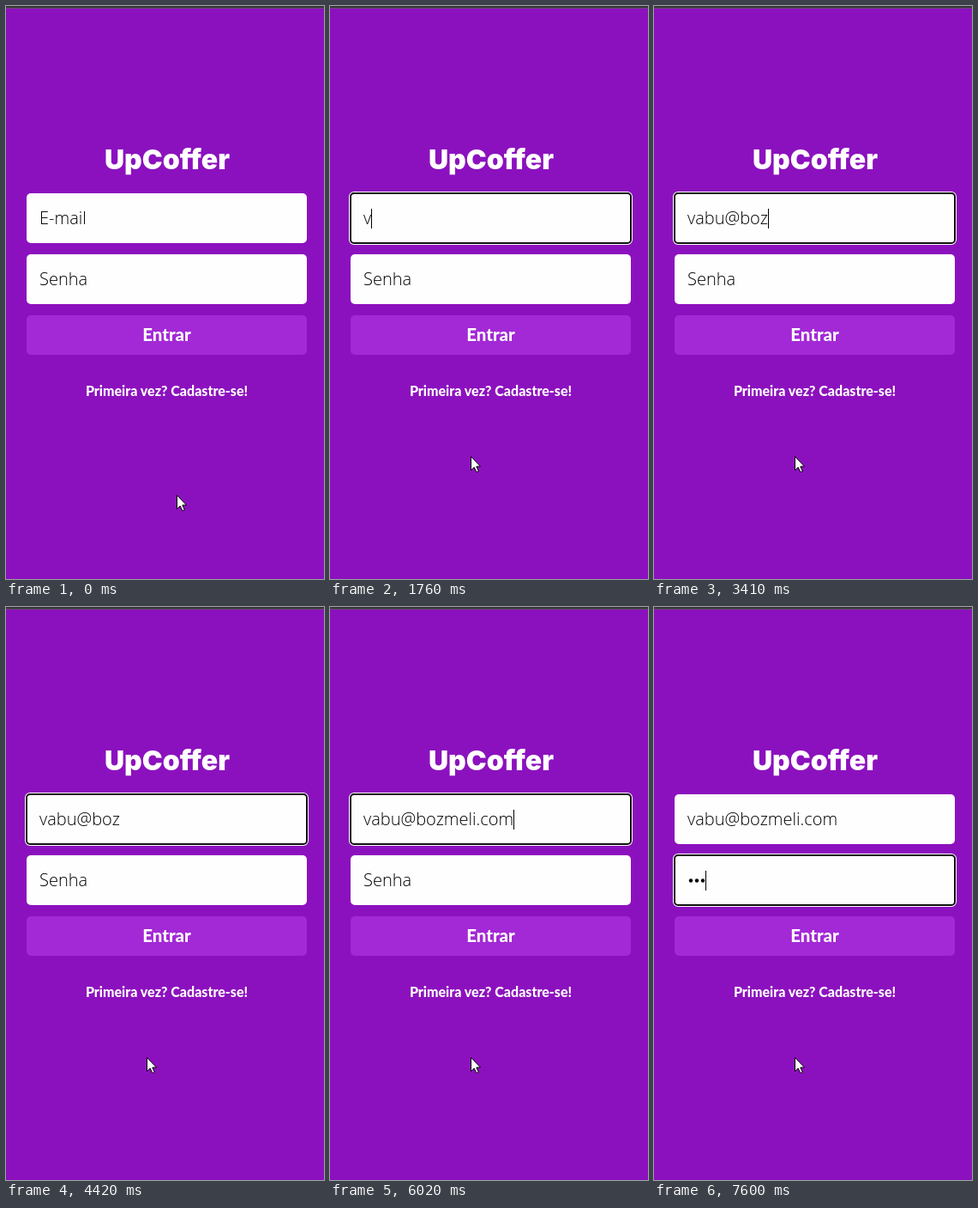
An HTML page that plays this animation: 371 by 667 pixels, repeating every 8000 ms.

```html
<!DOCTYPE html>
<html lang="pt">
<head>
<meta charset="utf-8">
<title>Login</title>
<style>
  html, body { margin: 0; width: 100%; height: 100%; overflow: hidden; background: #8c11be; }
  svg { display: block; width: 100vw; height: 100vh; }
  text { font: 350 20px "Open Sans", sans-serif; white-space: pre; }
  .light { font: 800 20.5px Lato, sans-serif; fill: #fff; text-anchor: middle; }
  .title { font: 900 32px Inter, sans-serif; }
  .link { font-size: 16px; }
</style>
</head>
<body>
<svg viewBox="0 0 371 667">
  <rect width="371" height="667" fill="#8c11be"/>
  <rect width="371" height="2" fill="#38353b"/>
  <rect y="2" width="371" height="1" fill="#5d5263"/>

  <text class="light title" x="188" y="190">UpCoffer</text>

  <rect x="24" y="218" width="327" height="58" rx="5" fill="#fefefe"/>
  <rect x="24" y="289" width="327" height="58" rx="5" fill="#fefefe"/>
  <g id="ring" fill="none">
    <rect x="24" y="218" width="327" height="58" rx="4" stroke="#fff" stroke-width="4"/>
    <rect x="24" y="218" width="327" height="58" rx="4" stroke="#101010" stroke-width="2"/>
  </g>
  <text id="email" x="39" y="254"></text>
  <text id="password" x="39" y="325">Senha</text>
  <g id="dots">
    <circle cx="43" cy="318.5" r="2.2"/>
    <circle cx="50" cy="318.5" r="2.2"/>
    <circle cx="57" cy="318.5" r="2.2"/>
  </g>
  <rect id="caret" width="1" height="23"/>

  <rect x="24" y="360" width="327" height="46" rx="5" fill="#a328d6"/>
  <text class="light" x="187.5" y="390">Entrar</text>
  <text class="light link" x="187.5" y="454">Primeira vez? Cadastre-se!</text>

  <path id="arrow" d="M.5 .5V16.5L4.2 13L6.8 18.5L9.4 17.5L6.8 12H11.5Z" fill="#fff" stroke="#000"/>
  <path id="beam" d="M-3 -7.5H-1M1 -7.5H3M-3 7.5H-1M1 7.5H3M0 -7V7" fill="none" stroke="#000"/>
</svg>
<script>
const LOOP = 8000;
const TICK = 120;        // screen refresh, also the pace within a burst of keys
const BLINK = 460;
const FIELD_GAP = 71;
const EMAIL_FOCUS = 720;
const PASSWORD_FOCUS = 6420;
const BACKSPACE = "<";

// Bursts of keys by start time
const emailBursts = {
  1760: "v", 2040: "abu", 2860: "@", 3140: "bo", 3410: "z",
  3960: "m", 4420: BACKSPACE, 4680: "mel", 5170: "i", 5780: ".c", 5900: "om"
};
const passwordBursts = { 7040: "*", 7350: "*", 7600: "*" };

const part = id => document.getElementById(id);
const [ring, email, password, dots, caret, arrow, beam] =
  ["ring", "email", "password", "dots", "caret", "arrow", "beam"].map(part);
const show = (node, on) => node.setAttribute("visibility", on ? "visible" : "hidden");
const move = (node, x, y) => node.setAttribute("transform", `translate(${x} ${y})`);
const mix = (a, b, k) => a + (b - a) * k;

function ease(time, from, to) {
  const k = Math.min(1, Math.max(0, (time - from) / (to - from)));
  return k * k * (3 - 2 * k);
}

function typeKeys(bursts, time, focusTime) {
  let text = "", lastInsert = focusTime;
  for (const [start, keys] of Object.entries(bursts)) {
    [...keys].forEach((key, i) => {
      const pressed = Number(start) + i * TICK;
      if (pressed > time) return;
      if (key === BACKSPACE) text = text.slice(0, -1);
      else {
        text += key;
        lastInsert = pressed;
      }
    });
  }
  return { text, lastInsert };
}

function drawFields(time) {
  const inPassword = time >= PASSWORD_FOCUS;
  const address = typeKeys(emailBursts, time, EMAIL_FOCUS);
  const secret = typeKeys(passwordBursts, time, PASSWORD_FOCUS);
  const active = inPassword ? secret : address;
  const offset = inPassword ? FIELD_GAP : 0;
  const focused = time >= EMAIL_FOCUS;

  email.textContent = address.text || "E-mail";
  show(password, !secret.text);
  [...dots.children].forEach((dot, i) => show(dot, i < secret.text.length));

  show(ring, focused);
  move(ring, 0, offset);

  const width = inPassword ? secret.text.length * 7
    : address.text ? email.getComputedTextLength() : 0;
  const lit = Math.floor((time - active.lastInsert) / BLINK) % 2 === 0;
  show(caret, focused && lit);
  move(caret, Math.round(39 + width), 236 + offset);
}

function drawPointer(time) {
  const tick = Math.floor(time / TICK) * TICK;
  const rise = ease(tick, 0, 720);
  const fall = ease(tick, 840, 1200);
  const x = Math.round(mix(mix(199, 143, rise), 164, fall));
  const y = Math.round(mix(mix(569, 258, rise), 524, fall));
  const overField = (y >= 218 && y < 276) || (y >= 289 && y < 347);
  show(beam, overField);
  show(arrow, !overField);
  move(beam, x + 0.5, y);
  move(arrow, x, y);
}

const start = performance.now();
function frame() {
  const time = (performance.now() - start) % LOOP;
  drawFields(time);
  drawPointer(time);
  requestAnimationFrame(frame);
}
frame();
</script>
</body>
</html>
```
